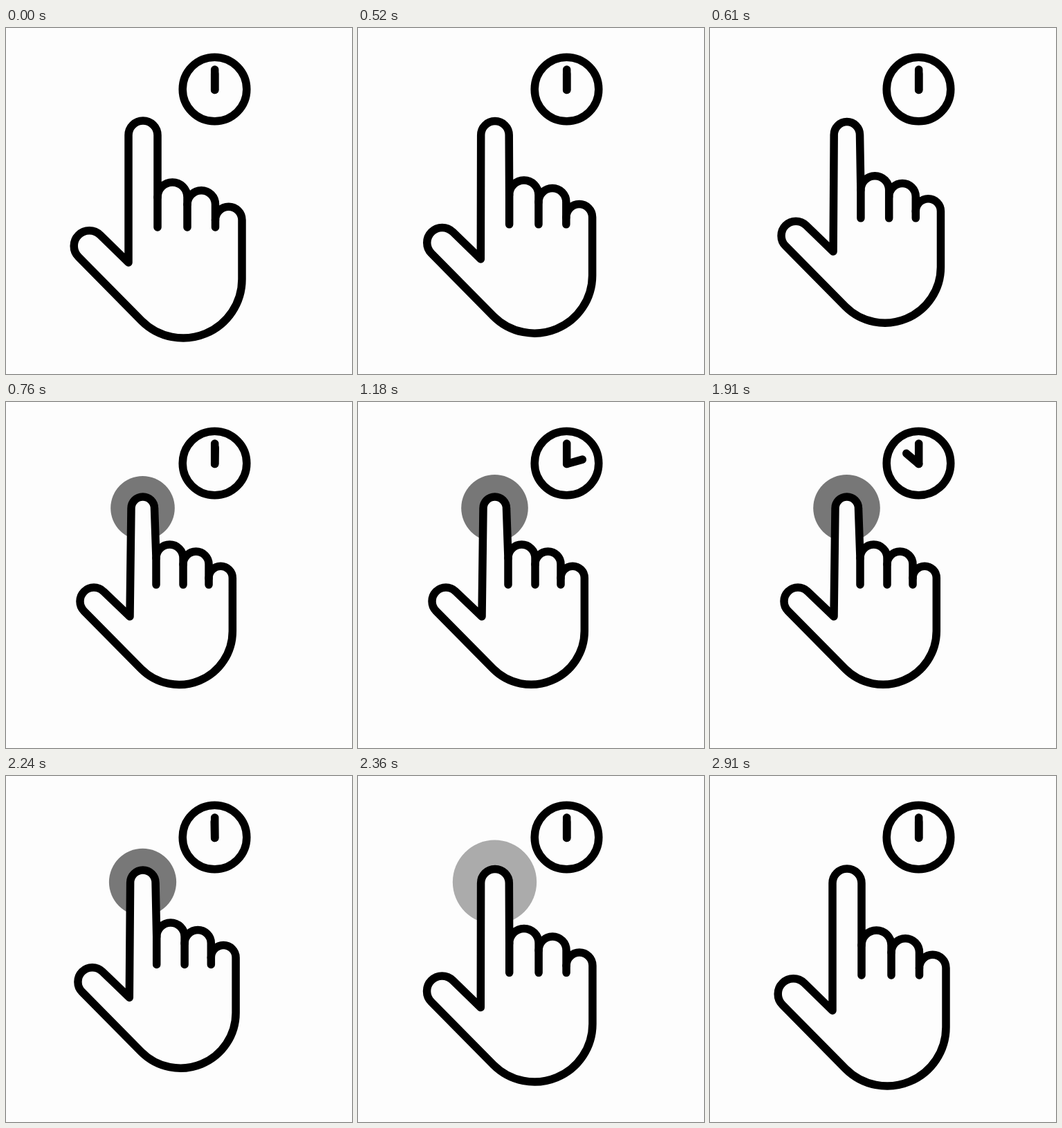
An HTML page for the animation above (3000 ms loop, 500 by 500 pixels).

```html
<!DOCTYPE html>
<html lang="en">
<head>
<meta charset="utf-8">
<title>Press and hold</title>
<style>
  html, body { margin: 0; width: 100%; height: 100%; overflow: hidden; background: #fdfdfd; }
  svg { display: block; width: 100%; height: 100%; }
  .line { fill: none; stroke: #000; stroke-width: 11.5; stroke-linecap: round; stroke-linejoin: round; }
  #outline { fill: #fdfdfd; }
</style>
</head>
<body>
<svg viewBox="0 0 500 500">
  <circle id="touch" cx="197.5" cy="153.3"/>
  <path id="outline" class="line"/>
  <path id="gaps" class="line"/>
  <circle class="line" cx="301.5" cy="88.5" r="46.3"/>
  <path class="line" d="M301.7 60V89.5"/>
  <path id="hour" class="line" d="M301.7 89.5V66"/>
</svg>
<script>
const LOOP = 3000;
const $ = id => document.getElementById(id);

// index: left, right, y; knuckles: x of the four edges, then y of the three arcs;
// corner: thumb crease; thumb and palm: centre x, y, radius
const rest = {
  index: [177, 219, 155], knuckles: [219, 262, 302.5, 341, 244.5, 255, 277.5], base: [288],
  corner: [177, 339], thumb: [120.5, 315, 22.3], palm: [256, 363, 85]
};
const pressed = {
  index: [181, 214.5, 153.7], knuckles: [217, 256, 293, 327.3, 225.5, 234.5, 254.3], base: [264],
  corner: [179, 310], thumb: [127, 288, 20], palm: [250, 331, 77.3]
};

const mix = (a, b, k) => a + (b - a) * k;
const ease = (time, start, end) => {
  const p = Math.min(1, Math.max(0, (time - start) / (end - start)));
  return (1 - Math.cos(Math.PI * p)) / 2;
};
const arc = (r, x, y) => `A${r} ${r} 0 0 1 ${x} ${y}`;

function drawHand(k) {
  const pose = {};
  for (const part in rest) pose[part] = rest[part].map((v, i) => mix(v, pressed[part][i], k));
  const { index: [left, right, tipY], knuckles, base, corner, thumb, palm } = pose;
  const [tx, ty, tr] = thumb, [px, py, pr] = palm;
  const d = Math.SQRT1_2;

  let path = `M${corner}L${left} ${tipY}` + arc((right - left) / 2, right, tipY);
  let gaps = '';
  for (let i = 0; i < 3; i++) {
    const x = knuckles[i], next = knuckles[i + 1], y = knuckles[i + 4];
    path += `L${x} ${y}` + arc((next - x) / 2, next, y);
    gaps += `M${x} ${y}V${base}`;
  }
  path += `L${px + pr} ${py}` + arc(pr, px - pr * d, py + pr * d)
        + `L${tx - tr * d} ${ty + tr * d}` + arc(tr, tx + tr * d, ty - tr * d) + 'Z';
  $('outline').setAttribute('d', path);
  $('gaps').setAttribute('d', gaps);
}

function draw(t) {
  drawHand(ease(t, 425, 775) - ease(t, 2100, 2450));

  const fade = ease(t, 2220, 2550);
  $('touch').setAttribute('r', 48.3 * ease(t, 500, 800) + 32 * fade);
  $('touch').setAttribute('fill-opacity', 0.53 * (1 - fade));

  $('hour').setAttribute('transform', `rotate(${360 * ease(t, 702, 2298)} 301.7 89.5)`);
}

const began = performance.now();
function tick() {
  draw((performance.now() - began) % LOOP);
  requestAnimationFrame(tick);
}
tick();
</script>
</body>
</html>
```
